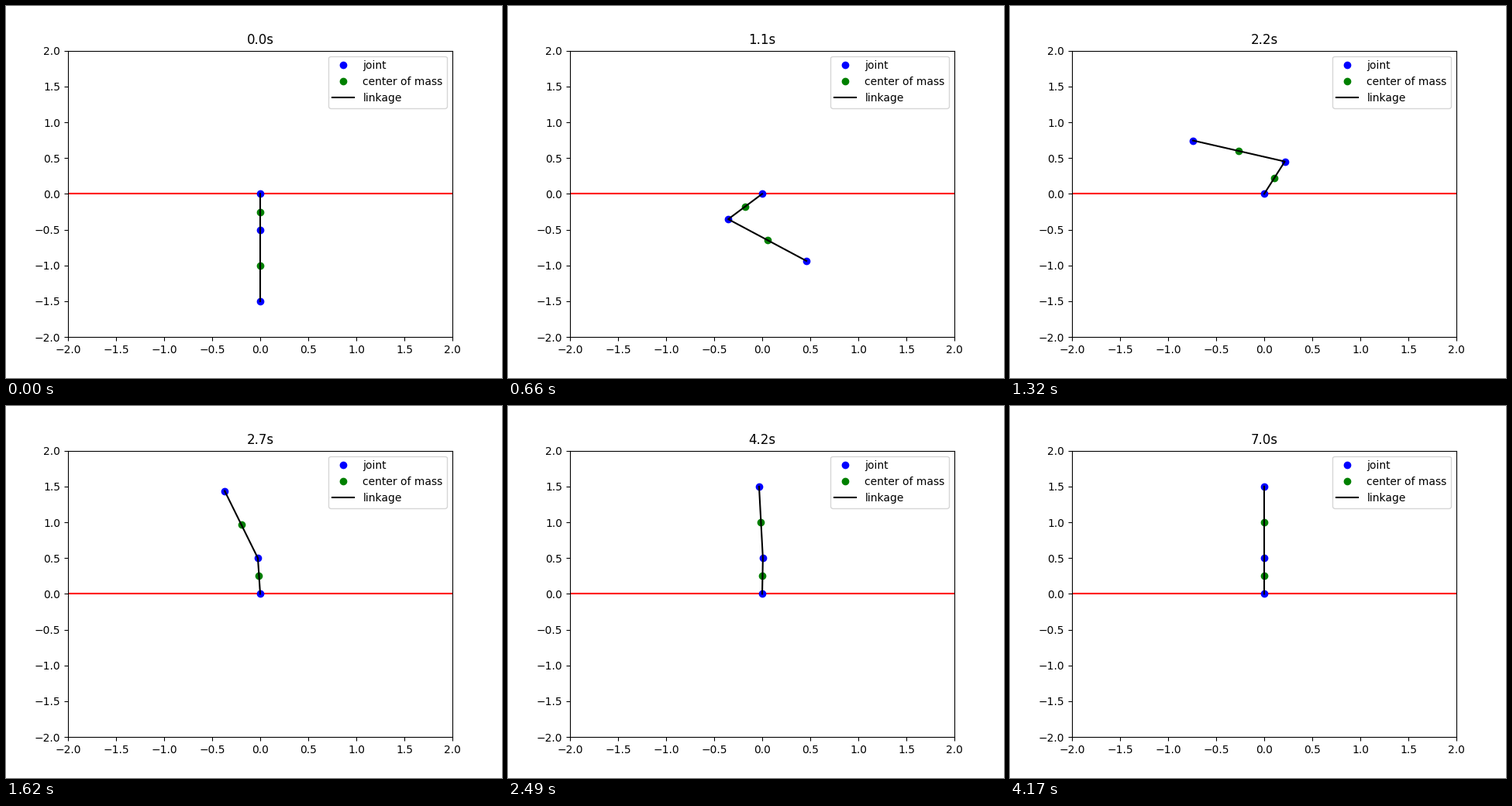
Recreate the animation shown at these times as a matplotlib script. Size 640 by 480 pixels, loop 4.2 s.

```python
import numpy as np
import matplotlib.pyplot as plt
from matplotlib.animation import FuncAnimation

L1, L2 = 0.5, 1.0
DT = 0.05
FRAMES = 140

# Key poses of the swing-up: time -> (upper, lower) angle in degrees, 0 = hanging
POSES = {
    0.0: (0, 0),
    0.5: (-20, 13),
    0.9: (-52, 42.3),
    1.1: (-45, 54.4),
    1.425: (31, 33.5),
    1.75: (117.4, -23.4),
    2.1: (146.5, -91),
    2.7: (182.8, -159.8),
}
TIMES = np.array(list(POSES))
ANGLES = np.array(list(POSES.values()), dtype=float)


def settle(s):
    """Damped approach to the upright pose, s seconds after the swing."""
    return np.array([180 + (2.8 - 10.6 * s) * np.exp(-1.9 * s),
                     -180 + 20.2 * np.exp(-1.508 * s)])


# Smooth passage through the poses: start at rest, end at the settling speed
RATES = np.gradient(ANGLES, TIMES, axis=0)
RATES[0] = 0
RATES[-1] = (settle(1e-4) - settle(0)) / 1e-4


def swing(t):
    i = np.searchsorted(TIMES, t, side="right") - 1
    h = TIMES[i + 1] - TIMES[i]
    u = (t - TIMES[i]) / h
    ease = u * u * (3 - 2 * u)
    return ((1 - ease) * ANGLES[i] + ease * ANGLES[i + 1]
            + h * u * (1 - u) * ((1 - u) * RATES[i] - u * RATES[i + 1]))


def link(length, angle):
    return length * np.array([np.sin(angle), -np.cos(angle)])


def pose(t):
    """Positions of base, elbow and tip."""
    end = TIMES[-1]
    upper, lower = np.radians(swing(t) if t < end else settle(t - end))
    elbow = link(L1, upper)
    return np.array([np.zeros(2), elbow, elbow + link(L2, lower)])


fig, ax = plt.subplots(figsize=(6.4, 4.8), dpi=100)
ax.set_xlim(-2, 2)
ax.set_ylim(-2, 2)
ax.plot([-2, 2], [0, 0], "r")
joints, = ax.plot([], [], "bo", label="joint")
masses, = ax.plot([], [], "go", label="center of mass")
rods, = ax.plot([], [], "k", label="linkage")
title = ax.set_title("0.0s")
ax.legend(loc="upper right")


def update(k):
    t = k * DT
    points = pose(t)
    joints.set_data(*points.T)
    rods.set_data(*points.T)
    masses.set_data(*((points[:-1] + points[1:]) / 2).T)
    title.set_text(f"{t:.1f}s")
    return joints, masses, rods, title


anim = FuncAnimation(fig, update, frames=FRAMES, interval=30, repeat=True, repeat_delay=0)
plt.show()
```
